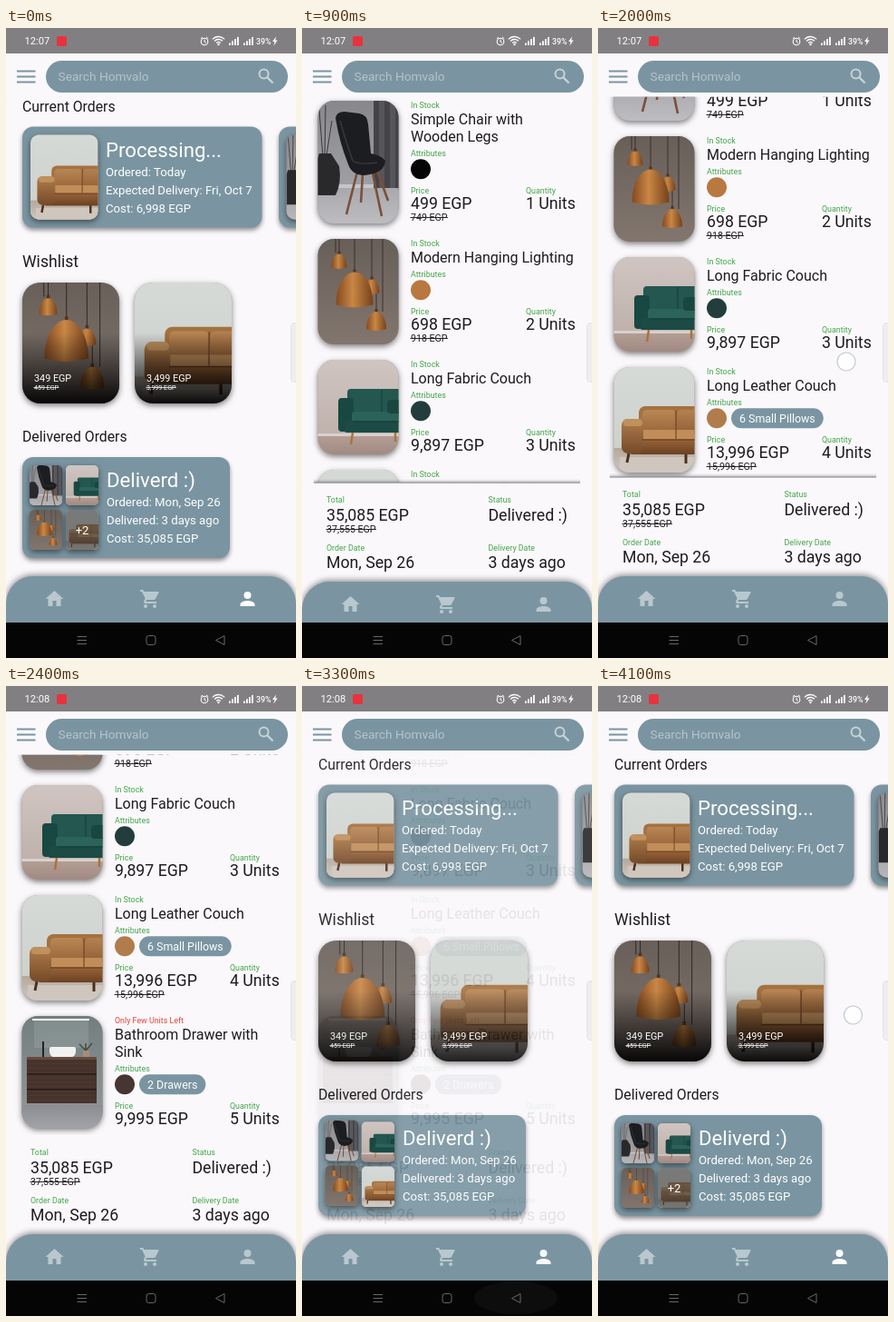
An HTML page with a canvas that plays this animation: 320x693 px, repeating every 4200 ms.

```html
<!DOCTYPE html>
<html lang="en">
<head>
<meta charset="utf-8">
<title>Furniture shop orders</title>
<style>
html, body { margin: 0; width: 100%; height: 100%; overflow: hidden; background: #faf8fb; }
canvas { display: block; width: 320px; height: 693px; }
</style>
</head>
<body>
<canvas id="stage"></canvas>
<script>
const W = 320, H = 693, LOOP = 4200, STEP = 100;
const PAPER = '#faf8fb', BLUE = '#7a95a1', INK = '#1d1b1e', GREEN = '#43a648', PALE = '#b9c8cf';
const dpr = window.devicePixelRatio || 1;

function prepare(canvas) {
  canvas.width = W * dpr;
  canvas.height = H * dpr;
  const context = canvas.getContext('2d');
  context.scale(dpr, dpr);
  return context;
}
const stage = prepare(document.getElementById('stage'));
const layerCanvas = document.createElement('canvas');
const layer = prepare(layerCanvas);
let c = stage;

// ---------- helpers ----------
const clamp = v => Math.min(1, Math.max(0, v));
const mix = (a, b, p) => a + (b - a) * p;

function fastOutSlowIn(u) {
  let lo = 0, hi = 1, s = u;
  for (let i = 0; i < 24; i++) {
    s = (lo + hi) / 2;
    const x = 3 * (1 - s) ** 2 * s * 0.4 + 3 * (1 - s) * s * s * 0.2 + s ** 3;
    if (x < u) lo = s; else hi = s;
  }
  return 3 * (1 - s) * s * s + s ** 3;
}

function keyed(keys, t) {
  if (t <= keys[0][0]) return keys[0][1];
  for (let i = 1; i < keys.length; i++) {
    const [t0, v0] = keys[i - 1], [t1, v1] = keys[i];
    if (t < t1) return mix(v0, v1, (t - t0) / (t1 - t0));
  }
  return keys[keys.length - 1][1];
}

function rect(x, y, w, h, color) {
  c.fillStyle = color;
  c.fillRect(x, y, w, h);
}

function round(x, y, w, h, r, color) {
  c.beginPath();
  c.roundRect(x, y, w, h, r);
  c.fillStyle = color;
  c.fill();
}

function disc(x, y, r, color) {
  c.beginPath();
  c.arc(x, y, r, 0, 7);
  c.fillStyle = color;
  c.fill();
}

function shape(d, color) {
  c.fillStyle = color;
  c.fill(new Path2D(d));
}

function line(d, color, width = 1) {
  c.strokeStyle = color;
  c.lineWidth = width;
  c.stroke(new Path2D(d));
}

function fade(y0, y1, from, to) {
  const g = c.createLinearGradient(0, y0, 0, y1);
  g.addColorStop(0, from);
  g.addColorStop(1, to);
  return g;
}

function shadowed(draw, alpha = 0.4, blur = 5, dy = 2.5) {
  c.save();
  c.shadowColor = `rgba(0,0,0,${alpha})`;
  c.shadowBlur = blur * dpr;
  c.shadowOffsetY = dy * dpr;
  draw();
  c.restore();
}

function text(str, x, y, size, color = INK, { weight = 400, strike = false, align = 'left' } = {}) {
  c.font = `${weight} ${size}px Roboto, sans-serif`;
  c.textAlign = align;
  c.fillStyle = color;
  c.fillText(str, x, y);
  if (strike) rect(x - 0.5, y - size * 0.38, c.measureText(str).width + 1, Math.max(0.7, size * 0.09), color);
}

// ---------- pictures, each in its own 90-wide box ----------
const pictures = {
  chair: { h: 135, draw() {
    rect(0, 0, 90, 135, fade(0, 95, '#88888c', '#a0a0a4'));
    for (let i = 0; i < 5; i++) rect(62 + i * 6, 0, 6, 98, i % 2 ? '#55555a' : '#444448');
    rect(0, 96, 90, 39, fade(96, 135, '#a9a8ac', '#bdbcc0'));
    rect(0, 92, 62, 4, '#c6c5c8');
    line('M6 62L2 10M10 60L16 22M8 60L9 5', '#3a3838', 1);
    shape('M2 58H15L24 72Q27 90 20 104H0V64Z', '#29292b');
    line('M44 78L32 125M61 80L71 127M50 80L48 112M66 77L78 110', '#79503a', 2.6);
    shape('M20 19Q21 12 30 12L46 14Q55 15 56 26L59 58Q70 60 75 66Q74 80 52 82Q38 82 34 70Q24 45 20 19Z', '#1c1d20');
    line('M25 22Q33 50 39 66Q46 71 66 68', 'rgba(120,120,126,.3)', 1.5);
  } },
  lamps: { h: 116, draw() {
    rect(0, 0, 90, 116, fade(0, 116, '#685f59', '#82766e'));
    line('M20 0V15M24 0V16M41 0V38M60 0V44M65 58V80M72 0V80', '#2b2521', 0.8);
    for (const [x, y, w] of [[60, 53, 17], [24, 25, 17], [65, 91, 22], [41, 57, 41]]) {
      const r = w / 2, g = c.createLinearGradient(x - r, 0, x + r, 0);
      g.addColorStop(0, '#85491f');
      g.addColorStop(0.45, '#c98745');
      g.addColorStop(1, '#75411c');
      rect(x - 1.5, y - r - 3, 3, 5, '#52351f');
      c.beginPath();
      c.moveTo(x - r, y + r * 0.75);
      c.bezierCurveTo(x - r, y - r * 0.3, x - r * 0.5, y - r, x, y - r);
      c.bezierCurveTo(x + r * 0.5, y - r, x + r, y - r * 0.3, x + r, y + r * 0.75);
      c.quadraticCurveTo(x, y + r * 1.05, x - r, y + r * 0.75);
      c.fillStyle = g;
      c.fill();
    }
  } },
  fabric: { h: 104, draw() {
    rect(0, 0, 90, 104, fade(0, 85, '#cfc5c1', '#bfb1ac'));
    rect(0, 84, 90, 20, fade(84, 104, '#b39d94', '#a08a83'));
    rect(0, 81, 90, 3, '#d9d0cd');
    line('M39 80L37 93M86 80V90', '#a9743c', 2.5);
    round(33, 32, 70, 34, 4, '#235750');
    round(23, 42, 17, 37, 4, '#194842');
    round(38, 57, 66, 11, 3, '#2b6259');
    round(30, 67, 72, 13, 2, '#1b4b44');
    line('M71 33V57M40 68H90', '#153c38', 1);
    round(77, 44, 16, 15, 4, '#1a4640');
  } },
  leather: { h: 116, draw() {
    rect(0, 0, 90, 116, fade(0, 90, '#d5dad7', '#cfd1cc'));
    rect(0, 89, 90, 27, fade(89, 116, '#b5a79b', '#d0c8c0'));
    rect(7, 99, 83, 17, '#cfc6bd');
    line('M17 95L15 105M80 95V106', '#4c3020', 3);
    round(28, 43, 80, 44, 7, '#a4713f');
    round(32, 47, 37, 27, 5, fade(47, 74, '#b98754', '#98643a'));
    round(70, 47, 40, 27, 5, fade(47, 74, '#b38150', '#925f36'));
    round(28, 69, 70, 11, 4, '#c18e5a');
    round(18, 79, 84, 17, 3, fade(79, 96, '#9a6538', '#6a4123'));
    round(9, 57, 24, 38, 7, fade(57, 95, '#b17d4b', '#754a29'));
    round(11, 57, 21, 8, 4, '#c0905d');
    line('M69 48V79M32 80H90', '#60391e', 1);
  } },
  drawer: { h: 123, draw() {
    rect(0, 0, 90, 123, fade(0, 96, '#737e7f', '#8c9393'));
    rect(12, 3, 63, 2, '#f5f4ed');
    rect(14, 5, 60, 30, 'rgba(210,220,220,.15)');
    rect(0, 98, 90, 25, fade(98, 123, '#8b8d91', '#a2a3a8'));
    line('M71 44V30M71 38L64 31M71 38L78 30', '#3f4e3d', 1.5);
    round(68, 38, 7, 8, 1, '#a68c76');
    rect(23, 28, 2, 17, '#222');
    round(31, 34, 29, 12, [2, 2, 7, 7], '#f1f1f0');
    rect(6, 45, 77, 51, '#47332c');
    rect(6, 45, 77, 3, '#654a3e');
    for (const y of [63, 80]) rect(6, y, 77, 1.5, '#251a17');
    for (let y = 52; y < 96; y += 5) rect(7, y, 75, 0.6, 'rgba(130,94,76,.25)');
  } },
};

function picture(name, x, y, w, h, r, shade) {
  const pic = pictures[name], scale = Math.max(w / 90, h / pic.h);
  c.save();
  c.beginPath();
  c.roundRect(x, y, w, h, r);
  c.clip();
  c.save();
  c.translate(x + (w - 90 * scale) / 2, y + (h - pic.h * scale) / 2);
  c.scale(scale, scale);
  pic.draw();
  c.restore();
  if (shade) rect(x, y, w, h, shade);
  c.restore();
}

function framed(name, x, y, w, h, r, shade) {
  shadowed(() => round(x, y, w, h, r, '#999'), 0.5, 6, 2.5);
  picture(name, x, y, w, h, r, shade);
}

// ---------- data ----------
const items = [
  { pic: 'chair', col: 0, row: 0, title: ['Simple Chair with', 'Wooden Legs'], swatch: '#050505', price: '499', old: '749' },
  { pic: 'lamps', col: 0, row: 1, title: ['Modern Hanging Lighting'], swatch: '#b87840', price: '698', old: '918' },
  { pic: 'fabric', col: 1, row: 0, title: ['Long Fabric Couch'], swatch: '#233d3d', price: '9,897' },
  { pic: 'leather', col: 1, row: 1, title: ['Long Leather Couch'], swatch: '#b07c4c', chip: '6 Small Pillows', price: '13,996', old: '15,996' },
  { pic: 'drawer', title: ['Bathroom Drawer with', 'Sink'], swatch: '#463530', chip: '2 Drawers', price: '9,995', few: true },
];
let nextTop = 80;
items.forEach((item, i) => {
  item.units = i + 1;
  item.top = nextTop;
  item.height = 104 + 19 * (item.title.length - 1) + (item.old ? 12 : 0);
  nextTop += item.height + 17;
});
const shared = items.slice(0, 4);
const gridBox = item => [26 + 40 * item.col, 481 + 49 * item.row, 36, 44, 5];
const listBox = (item, scroll) => [17.5, item.top - scroll, 89, item.height, 18];

// ---------- screens ----------
function card(x, y, w, h) {
  shadowed(() => round(x, y, w, h, 12, BLUE), 0.42, 5, 3);
}

function cardText(title, lines, x, y) {
  text(title, x, y, 22.2, '#fff');
  lines.forEach((str, i) => text(str, x, y + 21.2 + 20 * i, 13.2, '#fff'));
}

function wish(name, x, price, old) {
  const shade = fade(335, 413, 'rgba(0,0,0,0)', 'rgba(0,0,0,.95)');
  framed(name, x, 280, 107, 133, 20, shade);
  text(price, x + 13, 389, 10.8, '#fff');
  text(old, x + 13, 398, 7.1, '#fff', { strike: true });
}

function profilePage(showGrid) {
  rect(0, 28, W, 626, PAPER);
  text('Current Orders', 18, 91.6, 15.8);
  card(18, 108.5, 264.5, 111);
  framed('leather', 27, 117.5, 74.5, 93, 9);
  cardText('Processing...', ['Ordered: Today', 'Expected Delivery: Fri, Oct 7', 'Cost: 6,998 EGP'], 110, 141.7);
  card(301, 108.5, 264, 111);
  framed('chair', 309.5, 117.5, 74.5, 93, 9);
  text('Wishlist', 18, 263, 17.6);
  wish('lamps', 18, '349 EGP', '459 EGP');
  wish('leather', 142, '3,499 EGP', '3,999 EGP');
  text('Delivered Orders', 18, 455, 15.8);
  card(18, 472, 229, 111);
  if (showGrid) {
    for (const item of shared) framed(item.pic, ...gridBox(item), item.pic === 'leather' ? 'rgba(60,60,60,.6)' : null);
    text('+2', 84, 557, 13, '#fff', { align: 'center' });
  }
  cardText('Deliverd :)', ['Ordered: Mon, Sep 26', 'Delivered: 3 days ago', 'Cost: 35,085 EGP'], 111, 505);
  navBar(true);
}

function navBar(active) {
  shadowed(() => round(0, 603, W, 51, [30, 30, 0, 0], BLUE), 0.4, 6, -2);
  const icon = (x, color, d) => {
    c.save();
    c.translate(x - 12, 616);
    shape(d, color);
    c.restore();
  };
  icon(53.5, PALE, 'M10 20v-6h4v6h5v-8h3L12 3 2 12h3v8z');
  icon(159, PALE, 'M1 2h3.3l.9 2H21l.6 1-4 7.5-1.2.5H8.2l-1 2H19v2H6Q4.4 16 5.2 14.2L6.6 11.6 3 4H1z');
  disc(154, 636, 2, PALE);
  disc(164, 636, 2, PALE);
  icon(266.5, active ? '#fff' : PALE, 'M12 12a4 4 0 1 0 0-8 4 4 0 0 0 0 8zm0 2c-2.7 0-8 1.3-8 4v2h16v-2c0-2.7-5.3-4-8-4z');
}

function label(str, x, y, color = GREEN) {
  text(str, x, y, 8.9, color);
}

function listItem(item, scroll, showPicture) {
  const y = item.top - scroll, extra = 19 * (item.title.length - 1);
  if (showPicture) framed(item.pic, ...listBox(item, scroll));
  label(item.few ? 'Only Few Units Left' : 'In Stock', 120, y + 8, item.few ? '#e04436' : GREEN);
  item.title.forEach((str, i) => text(str, 120, y + 26 + 19 * i, 16));
  const z = y + extra;
  label('Attributes', 120, z + 42);
  disc(131, z + 56.3, 11, item.swatch);
  if (item.chip) {
    c.font = '12.4px Roboto, sans-serif';
    round(147, z + 45.3, c.measureText(item.chip).width + 18, 22, 11, BLUE);
    text(item.chip, 156, z + 60.7, 12.4, '#fff');
  }
  label('Price', 120, z + 82.5);
  label('Quantity', 247, z + 82.5);
  text(item.price + ' EGP', 120, z + 99.5, 17.7);
  text(item.units + ' Units', 247, z + 99.5, 17.7);
  if (item.old) text(item.old + ' EGP', 120, z + 113, 10.6, INK, { strike: true });
}

function summary(lineAlpha) {
  rect(0, 494, W, 160, PAPER);
  if (lineAlpha > 0) {
    c.save();
    c.globalAlpha = lineAlpha;
    rect(13, 490, 294, 4, fade(490, 494, 'rgba(0,0,0,0)', 'rgba(0,0,0,.22)'));
    rect(13, 493.5, 294, 1, '#858385');
    c.restore();
  }
  label('Total', 27, 515.5);
  text('35,085 EGP', 27, 536, 17.7);
  text('37,555 EGP', 27, 549, 10.6, INK, { strike: true });
  label('Order Date', 27, 568.5);
  text('Mon, Sep 26', 27, 588, 17.7);
  label('Status', 205.5, 515.5);
  text('Delivered :)', 205.5, 536, 17.7);
  label('Delivery Date', 205.5, 568.5);
  text('3 days ago', 205.5, 588, 17.7);
}

function orderPage(scroll, rise, inFlight) {
  rect(0, 28, W, 626, PAPER);
  c.save();
  c.beginPath();
  c.rect(0, 75.5, W, 578.5);
  c.clip();
  for (const item of items) listItem(item, scroll, !inFlight || !shared.includes(item));
  c.translate(0, (1 - rise) * 165);
  summary(clamp((254 - scroll) / 20));
  navBar(false);
  c.restore();
}

function header() {
  rect(0, 28, W, 47.5, PAPER);
  for (const y of [46.5, 52.5, 58.5]) rect(12, y, 20.5, 2, BLUE);
  round(44, 36, 267, 35, 17.5, BLUE);
  text('Search Homvalo', 57.5, 58, 13.7, '#b4c4cb');
  c.beginPath();
  c.arc(284.5, 50.5, 5, 0, 7);
  c.strokeStyle = '#c6d2d8';
  c.lineWidth = 2;
  c.stroke();
  line('M288 54L294.5 60.5', '#c6d2d8', 2.4);
}

function statusBar(clock) {
  rect(0, 0, W, 28, '#827f82');
  text(clock, 20.5, 18.2, 11.2, '#fff');
  round(56, 9, 11, 11, 2, '#e8323c');
  c.beginPath();
  c.arc(219, 15, 3.8, 0, 7);
  c.strokeStyle = '#fff';
  c.lineWidth = 1.1;
  c.stroke();
  line('M219 12.7V15.3L220.8 16.3M214.8 11.8L217 10M223.2 11.8L221 10', '#fff', 1);
  for (const r of [3, 6, 9]) {
    c.beginPath();
    c.arc(234.5, 18.5, r, -2.4, -0.75);
    c.lineWidth = 1.3;
    c.stroke();
  }
  disc(234.5, 18, 1.2, '#fff');
  for (const x of [246, 262]) {
    for (let i = 0; i < 4; i++) rect(x + i * 3, 16.5 - i * 2.2, 1.8, 2.5 + i * 2.2, '#fff');
  }
  text('39%', 276, 17.5, 8.8, '#fff', { weight: 500 });
  shape('M298 9.5L294 15H296.4L295.4 19.5L299.6 13.4H297.2Z', '#fff');
}

function systemBar(ripple) {
  rect(0, 654, W, 39, '#050505');
  if (ripple > 0) {
    c.beginPath();
    c.ellipse(236, 673, 46, 18, 0, 0, 7);
    c.fillStyle = `rgba(255,255,255,${0.03 * ripple})`;
    c.fill();
  }
  line('M78.5 669.5H89M78.5 673.5H89M78.5 677.5H89M241 668.5V678.5L231.5 673.5Z', '#686868', 1);
  c.beginPath();
  c.roundRect(155, 668.5, 10, 10, 2.5);
  c.stroke();
}

function pointer(x, y) {
  disc(x, y, 10, 'rgba(255,255,255,.8)');
  c.strokeStyle = '#c3c9d4';
  c.lineWidth = 1.2;
  c.stroke();
}

// ---------- timeline ----------
const scrollKeys = [[1800, 0], [1900, 36], [2000, 113], [2100, 187], [2200, 236], [2300, 256]];

function draw(t) {
  const enter = clamp((t - 196) / 380), leave = clamp((t - 2955) / 380);
  const opening = t < 2000;
  const travel = opening ? fastOutSlowIn(enter) : 1 - fastOutSlowIn(leave);
  const opacity = opening ? enter ** 1.3 : 1 - leave;
  const inFlight = opacity > 0 && opacity < 1;
  const scroll = keyed(scrollKeys, t);
  const rise = 1 - (1 - clamp((t - 600) / 450)) ** 3;

  c = stage;
  c.clearRect(0, 0, W, H);
  if (opacity < 1) profilePage(!inFlight);
  if (opacity > 0) {
    c = layer;
    c.clearRect(0, 0, W, H);
    orderPage(scroll, rise, inFlight);
    c = stage;
    c.globalAlpha = opacity;
    c.drawImage(layerCanvas, 0, 0, W, H);
    c.globalAlpha = 1;
  }
  header();
  if (inFlight) {
    for (const item of shared) {
      const to = listBox(item, scroll);
      framed(item.pic, ...gridBox(item).map((v, k) => mix(v, to[k], travel)));
    }
  }
  round(314, 324, 12, 66, 5, '#e3e1e4');
  round(315, 325, 12, 64, 4, '#efedf0');
  statusBar(t < 2200 ? '12:07' : '12:08');
  systemBar(clamp((t - 2800) / 200) * clamp((3600 - t) / 300));
  if (t >= 1800 && t < 2100) pointer(274, 480 - scroll);
  if (t >= 4000) pointer(281.5, 362);
}

const start = performance.now();
function tick() {
  const t = (performance.now() - start) % LOOP;
  draw(Math.floor(t / STEP) * STEP);
  requestAnimationFrame(tick);
}
tick();
</script>
</body>
</html>
```
